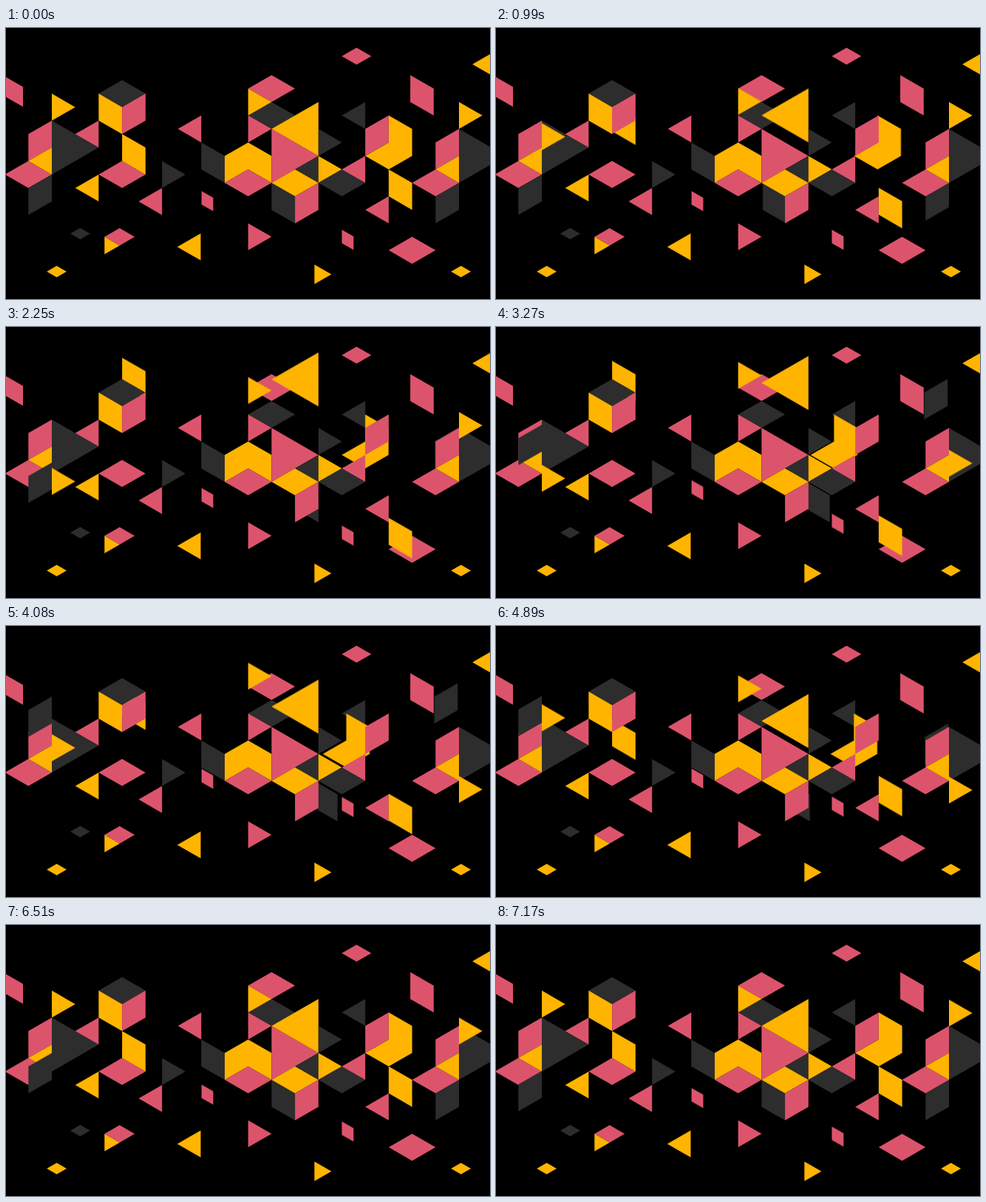
Write an HTML page that moves like this. It is 655x368 px and loops after 7200 ms.

```html
<!DOCTYPE html>
<html lang="en">
<head>
<meta charset="utf-8">
<title>Sliding tiles</title>
<style>
  html, body { margin: 0; width: 100%; height: 100%; overflow: hidden; background: #000; }
  svg { display: block; width: 100vw; height: 100vh; }
</style>
</head>
<body>
<svg id="stage" viewBox="0 0 655 368"></svg>
<script>
const LOOP = 7200, HALF = 2700, DELAY = 900;
const PINK = '#dc546c', GOLD = '#ffb400', DARK = '#2d2d2d';
const COL = 31.7, SLOPE = Math.tan(Math.PI / 6), ROW = COL * SLOPE;
const stage = document.getElementById('stage');

// Outward easings as Bezier handles; the way back mirrors them.
const QUICK = [0.4, 0.25, 0.7, 1];
const STEADY = [0.55, 0.4, 0.75, 1];
const SLOW = [0.75, 0.38, 0.72, 1];

// Outlines in half-tile steps: x in columns, y in rows.
const KINDS = {
  diamond: [[0, 0], [1, -1], [2, 0], [1, 1]],
  fall: [[0, 0], [1, 1], [1, 3], [0, 2]],
  rise: [[0, 0], [1, -1], [1, 1], [0, 2]],
  right: [[0, 0], [1, 1], [0, 2]],
  left: [[0, 0], [1, -1], [1, 1]],
  arch: [[0, 0], [1, -1], [2, 0], [2, 2], [1, 1], [0, 2]],
  fold: [[0, 0], [1, 1], [1, 3], [0, 4], [-1, 3], [0, 2]]
};

const bezier = handles => `cubic-bezier(${handles})`;
const mirror = handles => handles.map(v => 1 - v).reverse();
// Reversing swaps x and y inside each handle, so put them back in order.
const wayBack = handles => {
  const [y2, x2, y1, x1] = mirror(handles);
  return [x2, y2, x1, y1];
};

// Slides out by whole columns and rows, then home; turn 0, 1 or 2 sets the start.
function slide(el, [cols, rows, turn, ease]) {
  const start = turn * DELAY / LOOP, half = HALF / LOOP;
  const home = 'translate(0px, 0px)';
  const away = `translate(${cols * COL}px, ${rows * ROW}px)`;
  el.animate([
    { offset: 0, transform: home },
    { offset: start, transform: home, easing: bezier(ease) },
    { offset: start + half, transform: away, easing: bezier(wayBack(ease)) },
    { offset: start + 2 * half, transform: home },
    { offset: 1, transform: home }
  ], { duration: LOOP, iterations: Infinity });
}

function draw(kind, color, x, y, w = COL, move) {
  const el = document.createElementNS('http://www.w3.org/2000/svg', 'polygon');
  el.setAttribute('points', KINDS[kind].map(([i, j]) => [x + i * w, y + j * w * SLOPE]).join(' '));
  el.setAttribute('fill', color);
  stage.append(el);
  if (move) slide(el, move);
}

const grid = (x0, y0) => (kind, color, col, row, { size = 1, move } = {}) =>
  draw(kind, color, x0 + col * COL, y0 + row * ROW, size * COL, move);

const west = grid(30.3, 89.1);
const east = grid(264.3, 63.9);

// Left cluster
west('right', DARK, 1, 2, { size: 2 });
west('rise', PINK, 0, 3);
west('diamond', PINK, -1, 6);
west('left', GOLD, 0, 5);
west('rise', DARK, 0, 7, { move: [0, -6, 2, QUICK] });
west('left', PINK, 2, 3);
west('left', GOLD, 2, 7);
west('right', GOLD, 1, 0, { move: [0, 6, 0, QUICK] });

// Cube with a panel behind it
west('diamond', PINK, 3, 6);
west('fall', GOLD, 4, 3, { move: [0, -6, 0, QUICK] });
west('diamond', DARK, 3, 0);
west('fall', GOLD, 3, 0);
west('rise', PINK, 4, 1);

// Loose tiles
draw('fall', PINK, -0.4, 66.4, 23.4);
draw('right', DARK, 211.2, 180.7);
draw('left', PINK, 179.5, 235.6);
draw('left', PINK, 232.6, 137.1);
draw('diamond', DARK, 87, 279.2, 13.4);
draw('diamond', PINK, 133.3, 283.6, 20.4);
draw('right', GOLD, 133.3, 283.6, 20.4);
draw('left', GOLD, 231.8, 297.2);
for (const x of [55.2, 602.3]) draw('diamond', GOLD, x, 330.8, 13.4);
draw('right', GOLD, 417.4, 321.2, 23);
draw('diamond', PINK, 454.4, 38.3, 20);
draw('left', GOLD, 631.2, 49.3);
draw('fall', PINK, 547.1, 63.9);

// Centre cluster
east('fall', DARK, 0, 5);
draw('fall', PINK, 264.6, 221.4, COL / 2, [0, -1.65, 2, SLOW]);
east('arch', GOLD, 1, 6);
east('diamond', PINK, 1, 8);
east('diamond', PINK, 2, 1);
east('diamond', DARK, 2, 3);
east('right', PINK, 2, 3);
east('right', GOLD, 2, 1, { move: [0, -2, 1, SLOW] });
east('right', PINK, 3, 4, { size: 2 });
east('left', GOLD, 3, 4, { size: 2, move: [0, -4, 0, SLOW] });
east('left', DARK, 4, 7);
east('fall', DARK, 3, 8, { move: [2, 0, 1, STEADY] });
east('diamond', GOLD, 3, 8);
east('rise', PINK, 4, 9);
east('right', DARK, 5, 4);
east('right', GOLD, 5, 6);
east('diamond', DARK, 5, 8);
east('right', PINK, 2, 11);

// Folded sheet sliding behind the pink face
east('left', DARK, 6, 3);
east('fold', GOLD, 8, 3, { move: [-2, 0, 1, STEADY] });
east('left', PINK, 6, 7);
east('rise', PINK, 7, 4);
draw('fall', PINK, 454.5, 273.9, COL / 2, [0, -2.5, 2, SLOW]);
east('left', PINK, 7, 10);
east('diamond', PINK, 8, 13);
east('fall', GOLD, 8, 7, { move: [0, 4, 0, STEADY] });

// Right cluster
east('right', DARK, 11, 4, { size: 2 });
east('rise', DARK, 10, 9, { move: [-0.06, -8, 1, STEADY] });
east('rise', PINK, 10, 5);
east('diamond', PINK, 9, 8);
east('left', GOLD, 10, 7);
east('right', GOLD, 11, 2, { move: [0, 6, 2, QUICK] });
</script>
</body>
</html>
```
